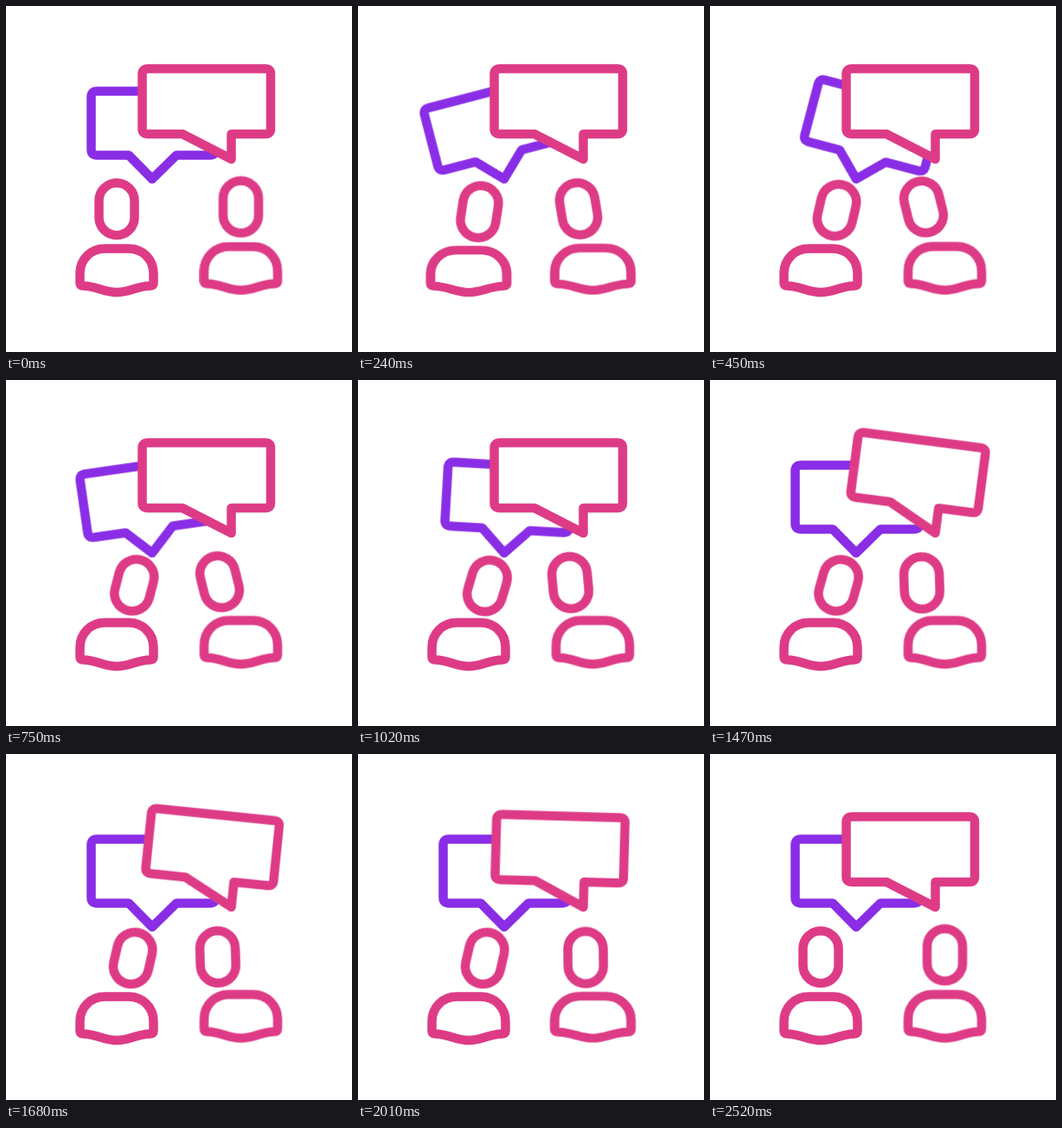
An HTML page without scripts that plays this animation: 400x400 px, repeating every 4550 ms.

```html
<!DOCTYPE html>
<html lang="en">
<head>
<meta charset="utf-8">
<title>Conversation</title>
<style>
  html, body { margin: 0; width: 100%; height: 100%; overflow: hidden; background: #fff; }
  svg { display: block; width: 100%; height: 100%; }
  .line { fill: #fff; stroke-width: 10.5; stroke-linejoin: round; stroke-linecap: round; }
  .pink { stroke: #de3b86; }
  .purple { stroke: #8a2de6; }

  .anim { animation: 4.55s ease-in-out infinite; }
  .bubble { animation-name: swing; }
  .bubble.purple { transform-origin: 169px 200px; }
  .bubble.pink { transform-origin: 261px 177px; animation-delay: 1.11s; }

  .head { transform-box: fill-box; transform-origin: center; }
  .body { transform-box: fill-box; transform-origin: 50% 100%; --dip: scale(1.04, .96); }
  .bob { --dip: translateY(2.4px); }
  .left .head { animation-name: lean-left; }
  .right .head { animation-name: lean-right; }
  .left .body, .left .bob { animation-name: dip-left; }
  .right .body, .right .bob { animation-name: dip-right; }

  /* decaying swing around the tip of the tail */
  @keyframes swing {
    0%, 27.9%, 100% { transform: rotate(0deg); }
    3.52% { transform: rotate(-20deg); }
    10% { transform: rotate(14.8deg); }
    15.9% { transform: rotate(-8.5deg); }
    21.3% { transform: rotate(3.5deg); }
  }
  @keyframes lean-left {
    0%, 53.4%, 100% { transform: translate(0, 0) rotate(0deg); }
    8.8% { transform: translate(18.5px, 1.3px) rotate(13deg); }
    16.5% { transform: translate(20.3px, 2.5px) rotate(14.5deg); }
    28.3% { transform: translate(22.5px, 4px) rotate(18.5deg); }
    36.3%, 44.8% { transform: translate(18.7px, 1.3px) rotate(13deg); }
  }
  @keyframes lean-right {
    0%, 47.3%, 100% { transform: translate(0, 0) rotate(0deg); }
    8.8% { transform: translate(-24.5px, 0) rotate(-14deg); }
    16.5% { transform: translate(-24.5px, 1px) rotate(-14deg); }
    25.7%, 39.3% { transform: translate(-26.6px, 2.3px) rotate(-2deg); }
  }
  @keyframes dip-left {
    0%, 8.8%, 44.8%, 53.4%, 100% { transform: none; }
    4.4%, 48.3% { transform: var(--dip); }
  }
  @keyframes dip-right {
    0%, 8.8%, 39.3%, 48.4%, 100% { transform: none; }
    4.4%, 43.7% { transform: var(--dip); }
  }
</style>
</head>
<body>
<svg viewBox="0 0 400 400">
  <defs>
    <rect id="head" x="107.5" y="204.5" width="41" height="60.5" rx="20.5"/>
    <path id="body" d="M114 280.5H142C158 280.5 170.5 293 170.5 309V320.5Q170.5 323.5 167 323.5C150 324 143 331 128 331S106 324 89 323.5Q85.5 323.5 85.5 320.5V309C85.5 293 98 280.5 114 280.5Z"/>
  </defs>

  <path class="line anim bubble purple" d="M105 98.500H236Q242.500 98.500 242.500 105V166Q242.500 172.500 236 172.500H197L169 200L142 172.500H105Q98.500 172.500 98.500 166V105Q98.500 98.500 105 98.500Z"/>
  <path class="line anim bubble pink" d="M164 72.500H300Q306 72.500 306 78.500V142Q306 148 300 148H260.500V177L204 148H164Q157.500 148 157.500 142V78.500Q157.500 72.500 164 72.500Z"/>

  <g class="line pink left">
    <use class="anim body" href="#body"/>
    <g class="anim bob"><use class="anim head" href="#head"/></g>
  </g>
  <g class="line pink right" transform="translate(143.5 -2.5)">
    <use class="anim body" href="#body"/>
    <g class="anim bob"><use class="anim head" href="#head"/></g>
  </g>
</svg>
</body>
</html>
```
